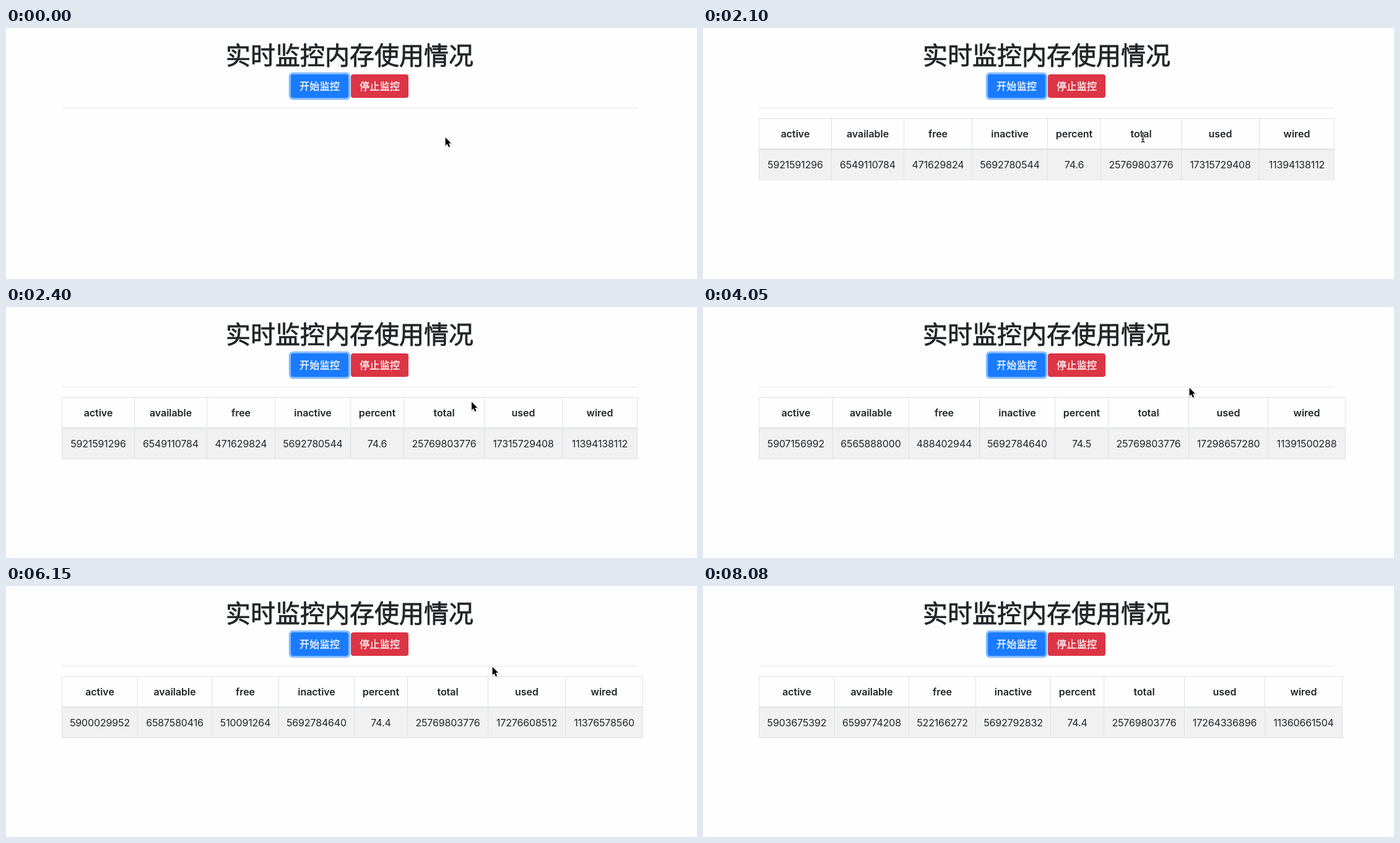
These frames come from a looping animation (1116 px wide and 406 px high, 8790 ms). An HTML page:

```html
<!DOCTYPE html>
<html lang="zh-CN">
<head>
<meta charset="utf-8">
<title>实时监控内存使用情况</title>
<style>
  html, body { margin: 0; width: 100%; height: 100%; overflow: hidden; background: #fefefe; }
  svg { display: block; width: 1116px; height: 406px; }
  text { text-anchor: middle; fill: #212529; }
  .cjk { font-family: "Noto Sans CJK SC", "Noto Sans CJK", sans-serif; }
  .title { font-size: 40px; stroke: #212529; stroke-width: .8px; }
  .label { font-size: 16px; letter-spacing: .4px; fill: #fff; stroke: #fff; stroke-width: .3px; }
  .cell { font: 400 16px Inter, sans-serif; letter-spacing: -.15px; }
  .head { font-weight: 600; letter-spacing: -.05px; }
  .line { fill: #dee2e6; shape-rendering: crispEdges; }
</style>
</head>
<body>
<svg viewBox="0 0 1116 406">
  <text class="cjk title" x="555" y="59">实时监控内存使用情况</text>
  <rect x="456.8" y="71.8" width="99.4" height="44.4" rx="6.5" fill="#86bdff"/>
  <rect x="460" y="75" width="93" height="38" rx="4" fill="#1a7bff"/>
  <rect x="557" y="75" width="93" height="38" rx="4" fill="#dc3545"/>
  <text class="cjk label" x="506.7" y="100">开始监控</text>
  <text class="cjk label" x="603.7" y="100">停止监控</text>
  <rect x="90" y="129" width="930" height="1" fill="#e5e5e5"/>
  <g id="table"></g>
  <g id="arrow">
    <path d="M0 0V13.2L3 10.4L5.2 15.4L7.5 14.4L5.4 9.5H9.4Z" transform="translate(.5 1.3)"
      fill="none" stroke="#000" stroke-opacity=".12" stroke-width="2.5"/>
    <path d="M0 0V13.2L3 10.4L5.2 15.4L7.5 14.4L5.4 9.5H9.4Z"
      stroke="#fff" stroke-width="1.8" paint-order="stroke"/>
  </g>
  <g id="beam" fill="none">
    <path d="M-3 -7.5Q0 -7.5 0 -5.5Q0 -7.5 3 -7.5M0 -5.5V5.5M-3 7.5Q0 7.5 0 5.5Q0 7.5 3 7.5M-2 3H2"
      stroke="#fff" stroke-width="2.6"/>
    <path d="M-3 -7.5Q0 -7.5 0 -5.5Q0 -7.5 3 -7.5M0 -5.5V5.5M-3 7.5Q0 7.5 0 5.5Q0 7.5 3 7.5M-2 3H2"
      stroke="#000" stroke-width="1.1"/>
  </g>
</svg>
<script>
const LOOP = 8790;
const heads = "active available free inactive percent total used wired".split(" ");

// Each reading: start time, column borders, values
const readings = [
  { t: 150, edges: [90, 205, 324, 437, 559, 645, 775, 899, 1025],
    row: "5901361152 6541819904 464322560 5692776448 74.6 25769803776 17321857024 11420495872" },
  { t: 2100, edges: [90, 207, 324, 434, 556, 642, 772, 898, 1019],
    row: "5921591296 6549110784 471629824 5692780544 74.6 25769803776 17315729408 11394138112" },
  { t: 4050, edges: [90, 209, 332, 446, 568, 654, 784, 912, 1037],
    row: "5907156992 6565888000 488402944 5692784640 74.5 25769803776 17298657280 11391500288" },
  { t: 6150, edges: [90, 212, 332, 440, 562, 648, 778, 903, 1028],
    row: "5900029952 6587580416 510091264 5692784640 74.4 25769803776 17276608512 11376578560" },
  { t: 8080, edges: [90, 212, 332, 440, 561, 647, 777, 907, 1032],
    row: "5903675392 6599774208 522166272 5692792832 74.4 25769803776 17264336896 11360661504" }
];

const pointer = [
  { t: 0, kind: "arrow", x: 709.6, y: 177 },
  { t: 150, kind: "beam", x: 710.5, y: 177 },
  { t: 2250, kind: "beam", x: 727.5, y: 171 },
  { t: 2400, kind: "arrow", x: 752, y: 153.5 },
  { t: 2550, kind: "arrow", x: 784.8, y: 130.8 },
  { t: 2700, kind: "arrow", x: 785.6, y: 130.8 },
  { t: 7490, kind: "arrow", x: 793.6, y: 137.5 },
  { t: 7640, kind: "arrow", x: 911.8, y: 239.5 },
  { t: 7790 }
];

const $ = id => document.getElementById(id);
const at = (steps, t) => steps.findLast(s => s.t <= t);
const bar = (x, y, w, h) => `<rect class="line" x="${x}" y="${y}" width="${w}" height="${h}"/>`;

function tableMarkup({ edges, row }) {
  const left = edges[0], width = edges.at(-1) - left + 1;
  const values = row.split(" ");
  const cells = heads.map((head, i) => {
    const mid = (edges[i] + edges[i + 1] + 1) / 2;
    return `<text class="cell head" x="${mid}" y="177">${head}</text>` +
      `<text class="cell" x="${mid}" y="227">${values[i]}</text>`;
  });
  return `<rect x="${left}" y="197" width="${width}" height="48" fill="#f1f1f1"/>` +
    bar(left, 146, width, 1) + bar(left, 195, width, 2) + bar(left, 245, width, 1) +
    edges.map(x => bar(x, 146, 1, 100)).join("") + cells.join("");
}

let shown;
function draw() {
  const t = performance.now() % LOOP;
  const reading = at(readings, t);
  if (reading !== shown) {
    $("table").innerHTML = reading ? tableMarkup(reading) : "";
    shown = reading;
  }
  const p = at(pointer, t);
  for (const kind of ["arrow", "beam"]) {
    const on = p.kind === kind;
    $(kind).style.display = on ? "" : "none";
    if (on) $(kind).setAttribute("transform", `translate(${p.x} ${p.y})`);
  }
  requestAnimationFrame(draw);
}
draw();
</script>
</body>
</html>
```
